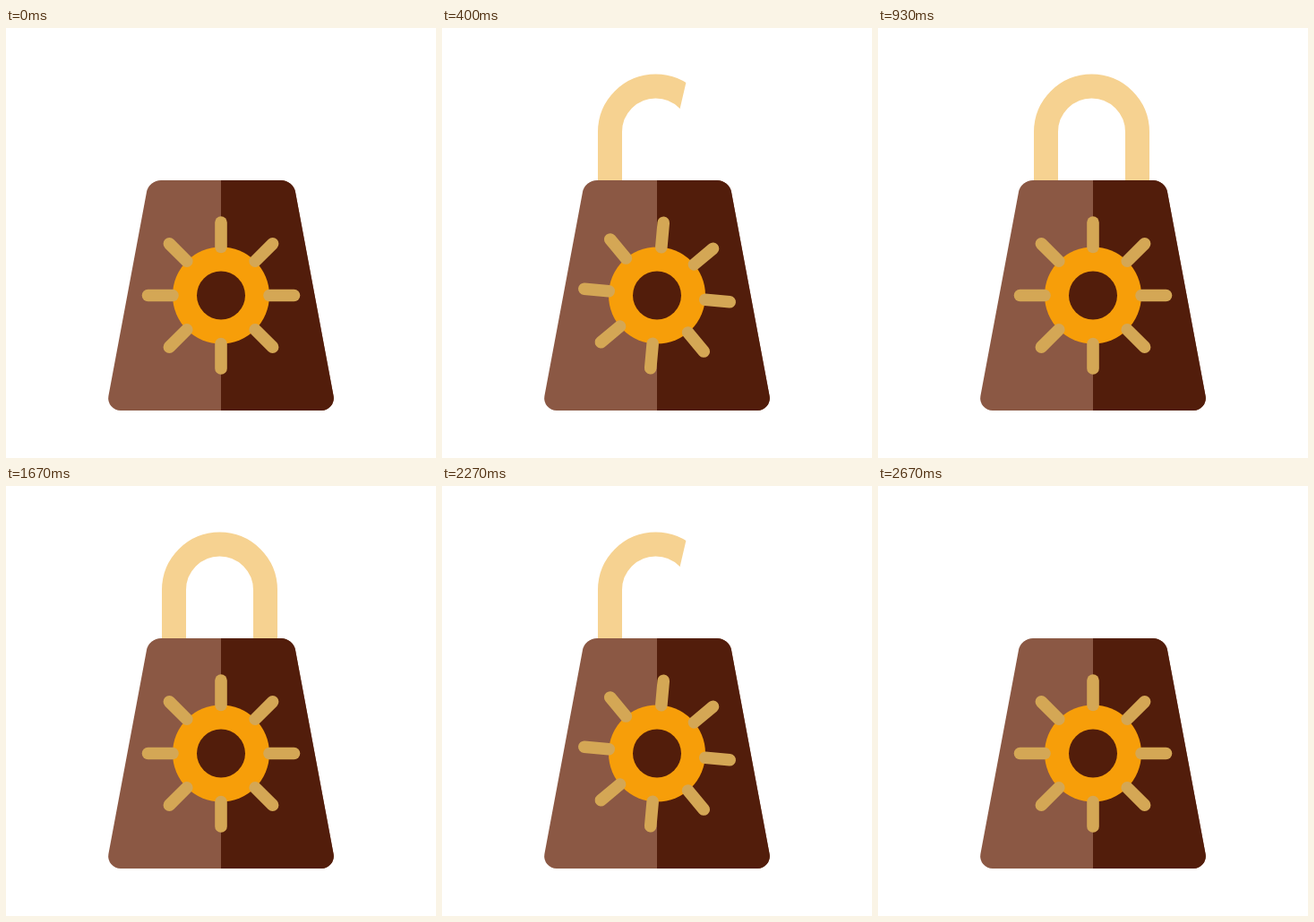
An HTML page for the animation above (2740 ms loop, 480x480 px).

```html
<!DOCTYPE html>
<html lang="en">
<head>
<meta charset="utf-8">
<title>Bag</title>
<style>
  html, body { margin: 0; width: 100%; height: 100%; overflow: hidden; background: #fff; }
  svg { display: block; width: 100%; height: 100%; }
</style>
</head>
<body>
<svg viewBox="0 0 480 480">
  <defs>
    <mask id="reveal" maskUnits="userSpaceOnUse" x="0" y="0" width="480" height="480">
      <path id="wipe" d="M188 177V97A26 26 0 0 1 214 71H264A26 26 0 0 1 290 97V177"
            fill="none" stroke="#fff" stroke-width="52"/>
    </mask>
    <clipPath id="rightHalf"><path d="M240 160H380V440H240Z"/></clipPath>
    <path id="shape" d="M173 170H307A16.4 16.4 0 0 1 323.1 183.4L365.6 410.7A13.8 13.8 0 0 1 352 427H128A13.8 13.8 0 0 1 114.4 410.7L156.9 183.4A16.4 16.4 0 0 1 173 170Z"/>
  </defs>
  <g mask="url(#reveal)">
    <path d="M187.5 175V116A51 51 0 0 1 289.5 116V175" fill="none" stroke="#f6d291" stroke-width="27"/>
  </g>
  <g id="body">
    <use href="#shape" fill="#8b5844"/>
    <use href="#shape" fill="#521d0b" clip-path="url(#rightHalf)"/>
    <circle cx="240" cy="298.5" r="54" fill="#f79e09"/>
    <circle cx="240" cy="298.5" r="27" fill="#521d0b"/>
    <g id="rays" stroke="#d4a755" stroke-width="13.6" stroke-linecap="round"></g>
  </g>
</svg>
<script>
  const LOOP = 2740, FRAMES = 41, STEP = LOOP / FRAMES;
  const DRAW_TIME = 720;
  const OUT_END = 40 * STEP;
  const CENTER = [240, 298.5];
  // [time, revealed length along the wipe path]
  const WIPE = [[0, 0], [200, 78], [400, 176.3], [600, 246.7], [DRAW_TIME, 292]];

  const byId = id => document.getElementById(id);
  const wipe = byId('wipe'), body = byId('body'), rays = byId('rays');
  const clamp = (v, lo, hi) => Math.min(hi, Math.max(lo, v));

  rays.innerHTML = Array.from({ length: 8 }, (_, i) =>
    `<path d="M240 217V244.5" transform="rotate(${i * 45} ${CENTER})"/>`).join('');

  function interpolate(keys, t) {
    for (let i = 1; i < keys.length; i++) {
      const [t0, v0] = keys[i - 1], [t1, v1] = keys[i];
      if (t <= t1) return v0 + (v1 - v0) * (t - t0) / (t1 - t0);
    }
    return keys[keys.length - 1][1];
  }

  function draw(now) {
    // Motion is stepped at about 15 fps
    const time = Math.floor((now % LOOP + 7) / STEP) % FRAMES * STEP;
    const progress = clamp(Math.min(time, OUT_END - time), 0, DRAW_TIME);

    const length = interpolate(WIPE, progress);
    wipe.setAttribute('stroke-dasharray', `${length} 1000`);
    wipe.style.visibility = length > 0.1 ? 'visible' : 'hidden';

    rays.setAttribute('transform', `rotate(${90 * progress / DRAW_TIME} ${CENTER})`);

    const pulse = clamp((time - 700) / 233, 0, 1);
    const scale = 1 + 0.04 * Math.sin(Math.PI * pulse);
    body.setAttribute('transform',
      `translate(${CENTER}) scale(${scale}) translate(${CENTER.map(v => -v)})`);
  }

  const start = performance.now();
  function tick() {
    draw(performance.now() - start);
    requestAnimationFrame(tick);
  }
  tick();
</script>
</body>
</html>
```
